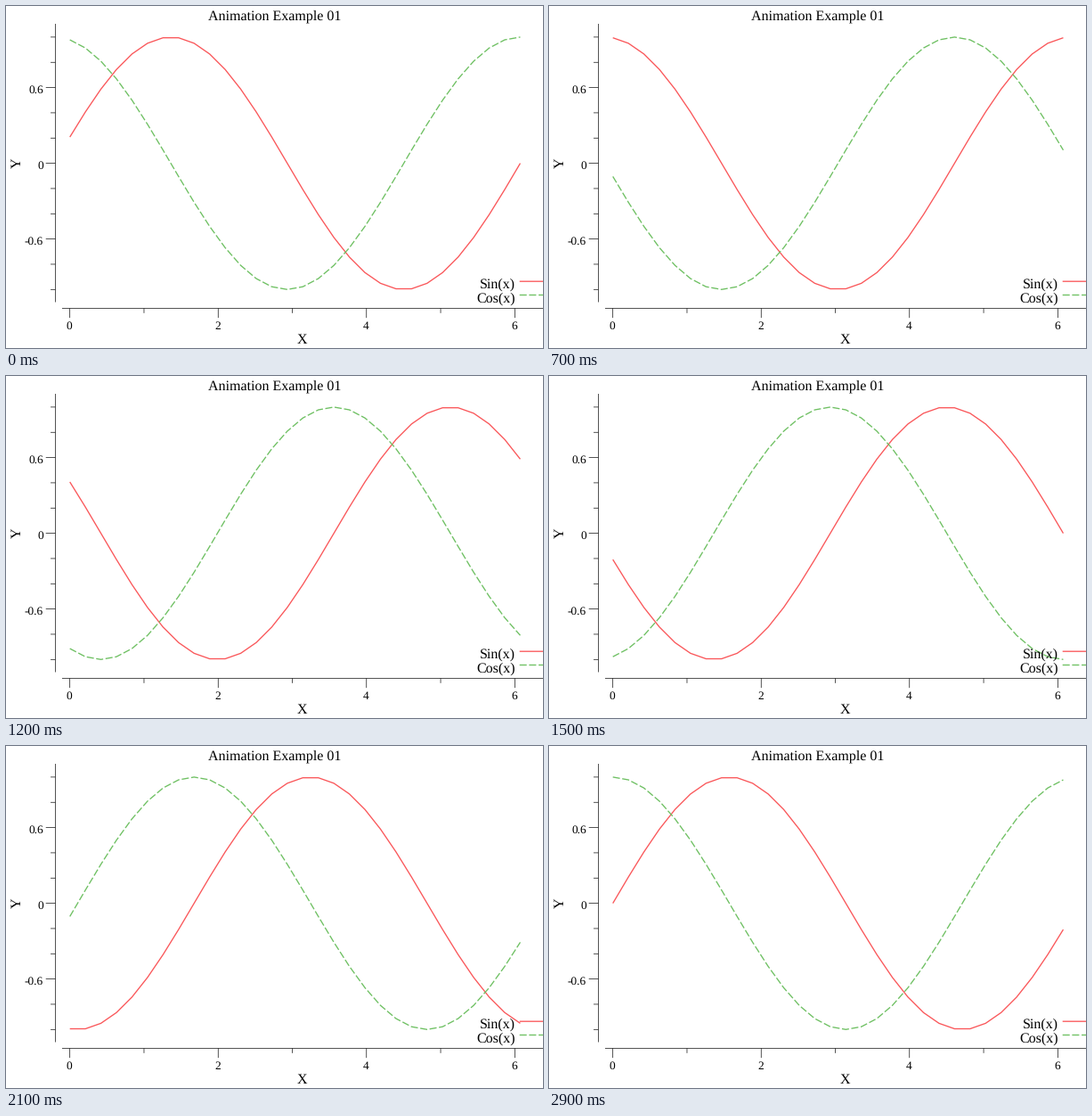
Animation, 603 px wide and 384 px high, one loop 3 s. Source, as a matplotlib script:

```python
import numpy as np
import matplotlib.pyplot as plt
from matplotlib.animation import FuncAnimation

plt.rcParams["font.family"] = "Liberation Serif"
plt.rcParams["text.hinting"] = "none"
plt.rcParams["path.simplify"] = False
plt.rcParams["path.snap"] = False

W, H, DPI = 603, 384, 96
FRAMES, INTERVAL = 30, 100
POINTS = 30
RED = (250 / 255, 87 / 255, 90 / 255)
GREEN = (110 / 255, 192 / 255, 98 / 255)
DASH = (6, 2)

AXIS_X, AXIS_Y = 55.4, 339.5
MAJOR, MINOR = 10.67, 5.33

fig = plt.figure(figsize=(W / DPI, H / DPI), dpi=DPI, facecolor="white")
ax = fig.add_axes([0, 0, 1, 1])
ax.set_xlim(0, W)
ax.set_ylim(H, 0)
ax.axis("off")


def to_px(x):
    return 71.7 + 83.27 * x


def to_py(y):
    return 176.6 - 141.7 * y


def rule(xs, ys):
    ax.plot(xs, ys, color="black", lw=0.5, solid_capstyle="butt", zorder=1)


def label(x, y, text, size=12, ha="center", **kw):
    ax.text(x, y, text, fontsize=size, ha=ha, va="baseline", color="black",
            zorder=4, **kw)


def curve(color, dashed, xs=(), ys=()):
    line, = ax.plot(xs, ys, color=color, lw=1, zorder=3,
                    solid_capstyle="butt", dash_capstyle="butt")
    if dashed:
        line.set_dashes(DASH)
    return line


# Axes and ticks
rule([AXIS_X, AXIS_X], [20, 332.5])
rule([63, W], [AXIS_Y, AXIS_Y])

for i in range(7):
    major = i % 2 == 0
    px = to_px(i)
    rule([px, px], [AXIS_Y, AXIS_Y + (MAJOR if major else MINOR)])
    if major:
        label(px - 0.6, 363, str(i), size=10)

for i in range(-5, 6):
    major = i % 3 == 0
    py = to_py(i / 5)
    rule([AXIS_X - (MAJOR if major else MINOR), AXIS_X], [py, py])
    if major:
        label(42, py + 6, f"{i / 5:g}", size=10, ha="right")

# Titles and legend
label(301.5, 15.5, "Animation Example 01")
label(332.5, 379, "X")
label(16.4, 176.6, "Y", rotation=90, rotation_mode="anchor")

for name, color, dashed, row in (("Sin(x)", RED, False, 0),
                                 ("Cos(x)", GREEN, True, 1)):
    label(572, 317 + 15.5 * row, name, ha="right")
    y = 309.2 + 15.3 * row
    curve(color, dashed, [576.7, 603.4], [y, y])

# Moving curves
theta = 2 * np.pi * np.arange(POINTS) / POINTS
sin_line = curve(RED, False)
cos_line = curve(GREEN, True)


def update(frame):
    phase = theta + 2 * np.pi * (frame + 1) / FRAMES
    sin_line.set_data(to_px(theta), to_py(np.sin(phase)))
    cos_line.set_data(to_px(theta), to_py(np.cos(phase)))
    return sin_line, cos_line


anim = FuncAnimation(fig, update, frames=FRAMES, interval=INTERVAL,
                     repeat=True, repeat_delay=0)
plt.show()
```
